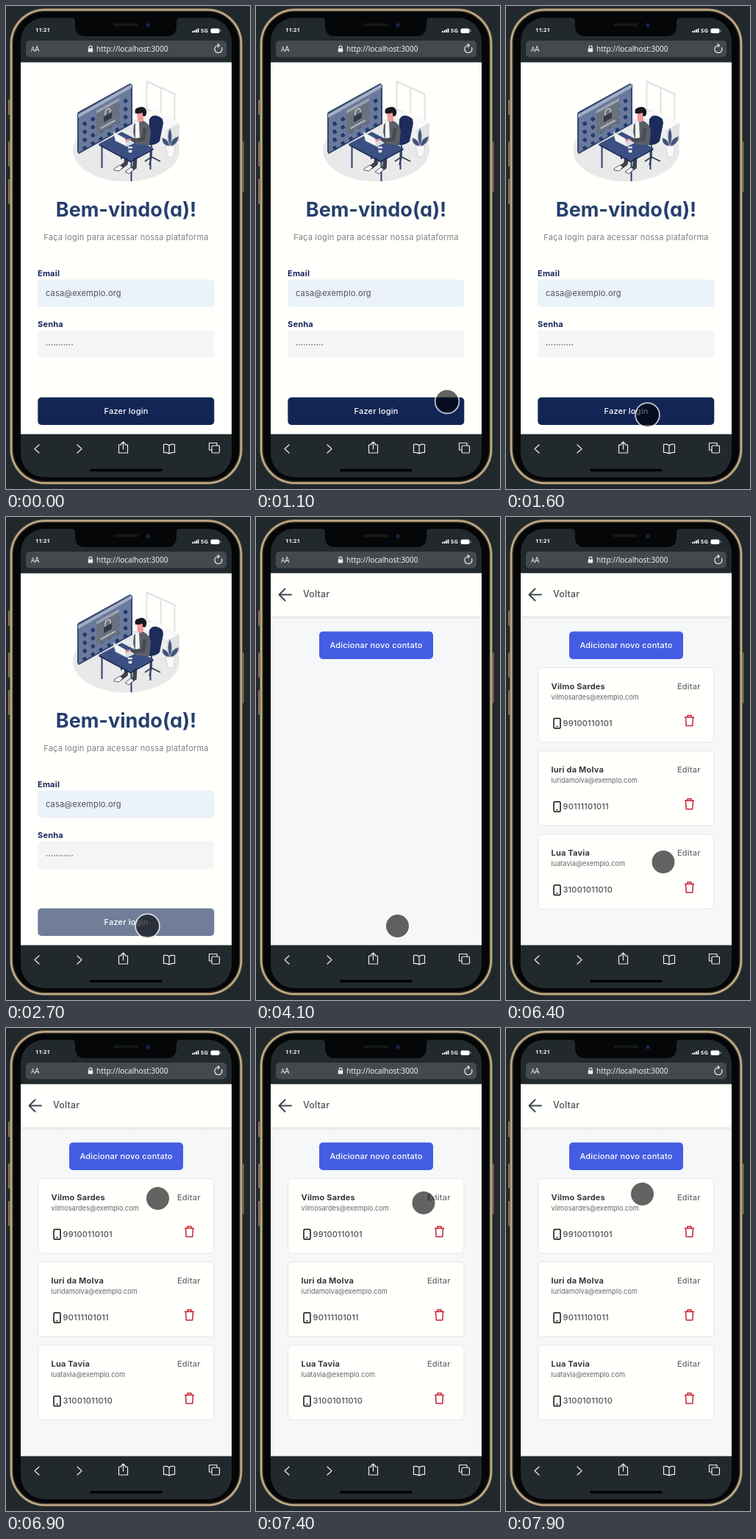
An HTML page for the animation above (8 s loop, 332x656 px).

```html
<!DOCTYPE html>
<html lang="pt-BR">
<head>
<meta charset="utf-8">
<title>Login e contatos</title>
<style>
html, body { margin: 0; height: 100%; overflow: hidden; background: #20282c; }
svg { display: block; width: 100vw; height: 100vh; }
text { font: 500 11px Inter, sans-serif; letter-spacing: .2px; fill: #4c5058; }
.bold { font-weight: 700; fill: #14245a; }
.title { font-size: 27px; font-weight: 700; letter-spacing: 0; fill: #263f6d; font-feature-settings: "cv11"; }
.soft { font-weight: 400; fill: #808080; }
.mail { font-size: 9.2px; font-weight: 400; letter-spacing: 0; fill: #62666a; }
.name { font-weight: 700; fill: #363a40; }
.sys text { font: 10px "Noto Sans", sans-serif; letter-spacing: 0; fill: #f2f2f2; }
.sys .small { font-size: 7.700px; font-weight: 700; }
.white { fill: #fff; }
.mid { text-anchor: middle; }
.line { fill: none; stroke: #ececec; stroke-width: 1.2; stroke-linecap: round; stroke-linejoin: round; }
</style>
</head>
<body>
<svg viewBox="0 0 332 656" preserveAspectRatio="none">
<defs>
  <linearGradient id="shade" x2="0" y2="1">
    <stop stop-color="#dfe2e5"/><stop offset="1" stop-color="#f5f7f9"/>
  </linearGradient>
</defs>

<!-- phone -->
<g fill="#857459">
  <rect x="3" y="127" width="3" height="21" rx="1"/><rect x="3" y="184" width="3" height="34" rx="1"/>
  <rect x="3" y="235" width="3" height="34" rx="1"/><rect x="320.500" y="184" width="3" height="69" rx="1"/>
</g>
<rect x="5" y="3" width="317" height="647" rx="48" fill="#6a5c47"/>
<rect x="7.200" y="5.200" width="312.600" height="642.600" rx="46" fill="#2a251e" stroke="#bfab87" stroke-width="2.600"/>
<rect x="10" y="8" width="307" height="637" rx="43" fill="#050607"/>
<rect x="20" y="16" width="287" height="624" rx="32" fill="#22292d"/>
<path d="M89 16q5 0 5 5v6q0 14 14 14h110q14 0 14-14v-6q0-5 5-5z" fill="#050607"/>
<rect x="146" y="23.500" width="34" height="4" rx="2" fill="#15181a"/>
<circle cx="193" cy="26" r="3.500" fill="#10142a"/><circle cx="193" cy="26" r="1.500" fill="#27365f"/>

<!-- browser -->
<g class="sys">
  <text class="small" x="40" y="35">11:21</text>
  <text class="small" x="265" y="36.300">5G</text>
  <path d="M254 36v-2M256.500 36v-3M259 36v-4.300M261.500 36v-5.500" stroke="#fff" stroke-width="1.700"/>
  <rect x="278.500" y="30.500" width="12" height="6.500" rx="2" fill="#fff"/><path d="M292 32.500v2.500" stroke="#aaa"/>
  <rect x="27" y="47" width="273" height="22.500" rx="5" fill="#45494d"/>
  <text x="34" y="62" style="font-size:8px">A</text><text x="39" y="62">A</text>
  <rect x="111.700" y="57.500" width="6.500" height="5" rx="1" fill="#eee"/>
  <path class="line" d="M113 57.500v-1.300a2 2 0 0 1 4 0v1.300"/>
  <text x="123" y="62">http://localhost:3000</text>
  <path class="line" d="M293.500 56.500A5 5 0 1 1 289 53.500M288 51.500l2.500 2-2.500 2.200"/>
</g>
<g class="line">
  <path d="M45 596l-6 5.500 6 5.500M97 596l6 5.500-6 5.500"/>
  <path d="M157 596h-3.500v11h12v-11H162M159.500 602v-10m-3 3l3-3 3 3"/>
  <path d="M222 597c-2-2-5-2-7.500-1.500v11c3-.5 5.500 0 7.500 1.500 2-1.500 4.500-2 7.500-1.500v-11c-2.500-.5-5.500-.5-7.500 1.500v11"/>
  <rect x="280" y="597" width="10.500" height="10" rx="1.500"/><path d="M280 603h-3.500v-9.500H287v3.500"/>
</g>
<path d="M116 630.500h95" stroke="#000" stroke-width="3.500" stroke-linecap="round"/>

<g id="login">
  <path d="M20 76.500h287v505H20z" fill="#fffffc"/>
  <ellipse cx="163.500" cy="196" rx="72.500" ry="42.500" fill="#e9e9ea"/>
  <!-- window and cabinet -->
  <path d="M191.500 102.500l38 17v38l-38-17zM210.500 111v38" fill="#fffffc" stroke="#e1e2e3" stroke-width="2"/>
  <path d="M186 150l16-9 34 18v25l-17 9-33-17z" fill="#efeff0"/>
  <path d="M186 150l16-9 34 18-17 9z" fill="#fafafa"/>
  <path d="M219 168l17-9v25l-17 9z" fill="#e0e1e3"/>
  <!-- big panel -->
  <path d="M97 147q0-3 3-4l69-38 3 2v53l-73 41-2-3z" fill="#33466f"/>
  <path d="M99 150l71-40v49l-71 40z" fill="#6a7a9d"/>
  <path d="M98 147l73-41v5l-73 41z" fill="#a3aec4"/>
  <path d="M105 161l62-34.500M105 172l62-34.500M105 183l62-34.500M105 194l62-34.500" stroke="#24396b" stroke-width="5" stroke-dasharray="5 7.700"/>
  <path d="M123 142l31-17v33l-31 17z" fill="#6b727f"/>
  <path d="M123 142l31-17v4l-31 17z" fill="#9ba3b1"/>
  <path d="M135 150v-5c0-5 7-8 7-3v4" fill="none" stroke="#d8dadd" stroke-width="1.200"/>
  <path d="M133 150l11-6v8l-11 6z" fill="#343a45"/>
  <path d="M129 166l20-11" stroke="#d3d5d8" stroke-width="2.500" stroke-dasharray="1.500 1"/>
  <!-- chair -->
  <path d="M195 154q3-6 10-5 9 2 9 10l-5 25q-9 8-23 3l-3-6 11-5z" fill="#1d2c5c"/>
  <path d="M198 188v18m-9 5l9-6 12 6m-12-6l-3 11" stroke="#343a48" stroke-width="1.700" fill="none"/>
  <!-- desk -->
  <path d="M130.500 189v31M196.500 197v25M170.500 211v27M157 186v22" stroke="#2c3f6d" stroke-width="2"/>
  <!-- person -->
  <path d="M183 187l-17 5-3 22-8 6M186 189l-10 8-1 22-6 4" fill="none" stroke="#3d4149" stroke-width="5.500"/>
  <path d="M147 221l8-5 4 3-5 5-7-1zM162 225l8-6 4 3-7 6z" fill="#f7f7f7" stroke="#343840" stroke-width=".8"/>
  <path d="M126.500 187l31-16 43 22-31 17z" fill="#3a4f82"/>
  <path d="M126.500 187l43 23 31-17v2.500l-31 17-43-23z" fill="#1c2d5b"/>
  <path d="M174 161q6-7 13-5 9 4 10 15l-2 18-18-1-4-17z" fill="#5b6067"/>
  <path d="M176 158l5-2 1 23-6 2z" fill="#f4f4f4"/>
  <path d="M189 166l-2 15-18 2" fill="none" stroke="#474c53" stroke-width="5" stroke-linejoin="round"/>
  <path d="M168 182l-6 1" stroke="#ed8f91" stroke-width="3.500" stroke-linecap="round"/>
  <path d="M178 145h9v10q-5 5-8 0z" fill="#f19a99"/>
  <path d="M176 146q-2-7 4-8 7-3 10 2 3 5-1 10l-3-1v-4l-5 1z" fill="#17191f"/>
  <path d="M146 171l16 9 3 11-16-8z" fill="#f6f6f7" stroke="#c4c8d0" stroke-width=".7"/>
  <path d="M165 191l10-5-6-4-7 3z" fill="#d7dae0"/>
  <path d="M166 191h6l-1 8h-4z" fill="#fff"/><path d="M166 193h6v3h-6z" fill="#5a6b92"/>
  <!-- plant -->
  <path d="M223 191q-12-3-10-12 8 2 10 12-5-15 0-25 5 10 0 25 2-12 12-14-1 11-12 14" fill="#415478" stroke="#a8b1c2" stroke-width=".6"/>
  <path d="M217 190h13l-2 14q-4 3-8 0z" fill="#f9f9fa" stroke="#c4c7cd" stroke-width=".7"/>

  <text class="title mid" x="163.500" y="285.500">Bem-vindo(a)!</text>
  <text class="soft mid" x="163.500" y="318">Faça login para acessar nossa plataforma</text>
  <text class="bold" x="43" y="367">Email</text>
  <rect x="43.300" y="371.500" width="240" height="37.500" rx="5" fill="#ecf2fa"/>
  <text x="54" y="394" style="font-weight:400">casa@exemplo.org</text>
  <text class="bold" x="43" y="435.700">Senha</text>
  <rect x="43.300" y="440.300" width="240" height="37.500" rx="5" fill="#f4f5f6"/>
  <path d="M55.500 460h34.600" stroke="#85888c" stroke-width="1.900" stroke-linecap="round" stroke-dasharray="0 3.450"/>
  <rect id="enter" x="43.300" y="531.500" width="240" height="37.500" rx="5"/>
  <text class="white mid" x="163.500" y="554">Fazer login</text>
</g>

<g id="contacts">
  <path d="M20 76.500h287v505H20z" fill="#f5f7f9"/>
  <path d="M20 135h287v4H20z" fill="url(#shade)"/>
  <path d="M20 76.500h287V135H20z" fill="#fffffc"/>
  <path d="M48 105.500H32m7.500-8l-8 8 8 8" fill="none" stroke="#404a54" stroke-width="2" stroke-linecap="round" stroke-linejoin="round"/>
  <text x="64" y="109" style="font-size:12.400px">Voltar</text>
  <rect x="86" y="155.500" width="155" height="37.500" rx="5" fill="#445de2"/>
  <text class="white mid" x="163.500" y="178">Adicionar novo contato</text>
  <g id="cards"></g>
</g>

<g id="cursor">
  <circle r="15.700" fill="#000" fill-opacity=".61"/>
  <circle r="16.400" fill="none" stroke="#fff" stroke-opacity=".72" stroke-width="1.800"/>
</g>
</svg>
<script>
const LOOP = 8000, STEP = 100;
const PRESS = 2700, OPEN = 4000, LIST = 4600, ICONS = 4900;
const $ = id => document.getElementById(id);
const show = (el, on) => el.setAttribute('visibility', on ? 'inherit' : 'hidden');

const people = [
  ['Vilmo Sardes', 'vilmosardes', '99100110101'],
  ['Iuri da Molva', 'iuridamolva', '90111101011'],
  ['Lua Tavia', 'luatavia', '31001011010']
];

const card = ([name, user, phone], i) => `<g transform="translate(43.500 ${204.5 + i * 113.2})">
  <rect width="239.500" height="101.500" rx="5" fill="#fffffc" stroke="#e2e5e8"/>
  <text class="name" x="18" y="29">${name}</text>
  <text class="mail" x="18" y="43.500">${user}@exemplo.com</text>
  <text x="189.500" y="29" style="fill:#666a6f">Editar</text>
  <text class="phone" y="79.500">${phone}</text>
  <g class="icons" fill="none" stroke-linejoin="round">
    <rect x="21.500" y="69" width="9" height="13.500" rx="1.500" stroke="#111" stroke-width="1.500"/>
    <path d="M25 80h2" stroke="#111" stroke-width="1.500"/>
    <path d="M199.500 67.500h13M203.500 67.500v-2.500h5v2.500M201 67.500l.7 11.500h8.600l.7-11.500" stroke="#c62435" stroke-width="1.500"/>
  </g></g>`;
$('cards').innerHTML = people.map(card).join('');

// time, x, y
const path = [
  [900, 308.5, 516], [1100, 260, 537], [1300, 214, 552], [1600, 192.5, 555.5],
  [5200, 192.5, 555.5], [5300, 213, 540], [5400, 241, 519], [5500, 255.5, 509.5],
  [5600, 255.5, 509.5], [5800, 229.5, 500.5], [6300, 229.5, 500.5], [6400, 214, 468.5],
  [6700, 188.5, 300], [6900, 206.5, 231.5], [7100, 244, 197.5], [7200, 253.5, 215],
  [7400, 228, 237.5], [7600, 201, 195], [7700, 190, 181.5], [7800, 184.5, 204], [7900, 185.5, 225.5]
];

function cursorAt(t) {
  const i = path.findIndex(p => p[0] > t);
  if (i < 0) return path[path.length - 1].slice(1);
  const a = path[i - 1], b = path[i], k = (t - a[0]) / (b[0] - a[0]);
  return [a[1] + (b[1] - a[1]) * k, a[2] + (b[2] - a[2]) * k];
}

const icons = document.querySelectorAll('.icons');
const phones = document.querySelectorAll('.phone');

function draw(now) {
  const t = Math.floor(now % LOOP / STEP) * STEP;
  const pointing = t >= path[0][0];
  show($('login'), t < OPEN);
  show($('contacts'), t >= OPEN);
  show($('cards'), t >= LIST);
  $('enter').setAttribute('fill', t < PRESS ? '#132555' : '#707e99');
  icons.forEach(el => show(el, t >= ICONS));
  phones.forEach(el => el.setAttribute('x', t < ICONS ? 18 : 34));
  show($('cursor'), pointing);
  if (pointing) $('cursor').setAttribute('transform', `translate(${cursorAt(t)})`);
  requestAnimationFrame(draw);
}
draw(performance.now());
</script>
</body>
</html>
```
